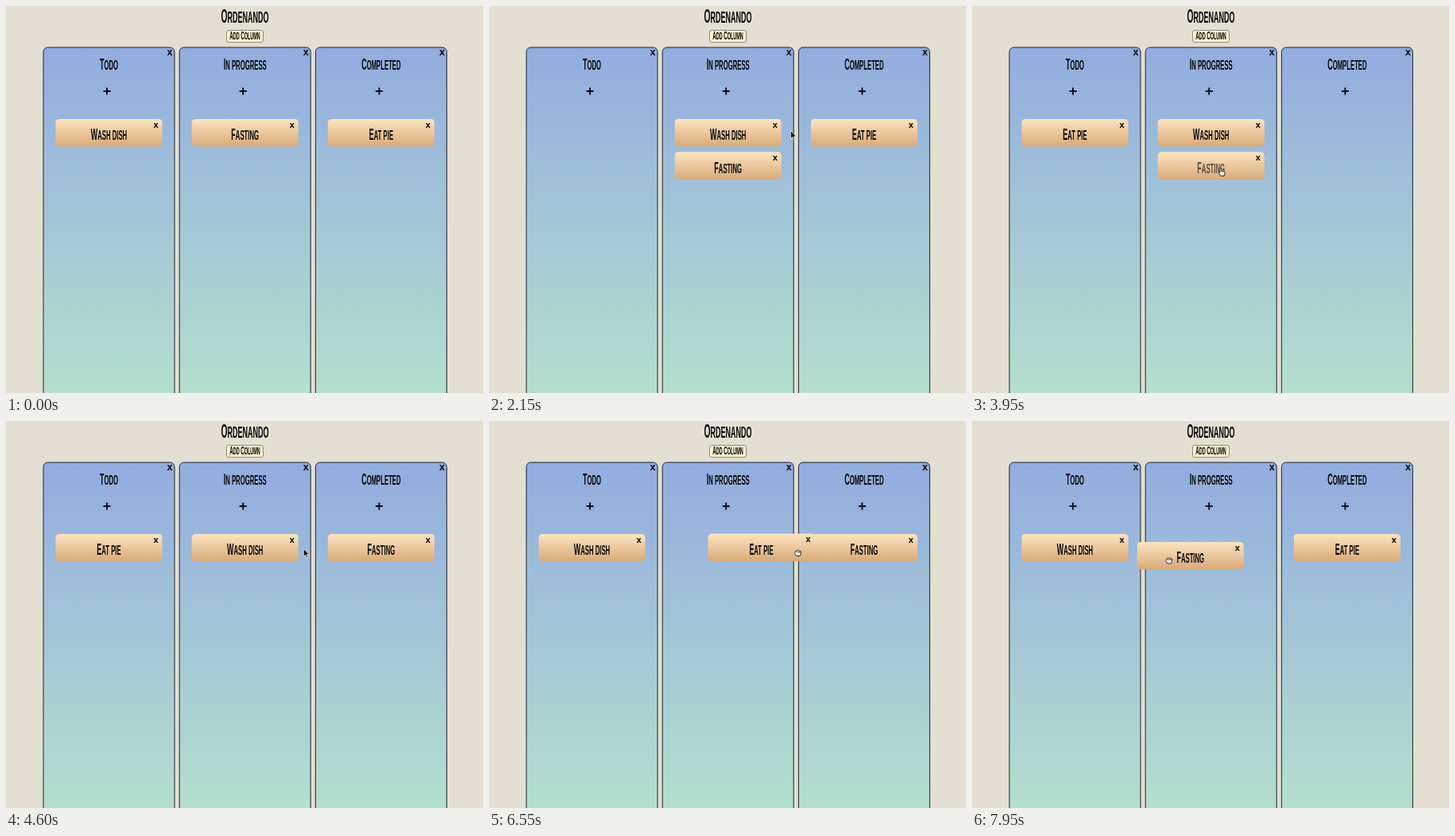
These frames come from a looping animation (600x486 px, 8000 ms). An HTML page:

```html
<!DOCTYPE html>
<html lang="en">
<head>
<meta charset="utf-8">
<title>Task board</title>
<style>
  html, body { margin: 0; width: 100%; height: 100%; overflow: hidden; background: #e3dfd3; }
  svg { display: block; width: 100%; height: 100%; }
  text { font-family: "Liberation Sans", Arial, sans-serif; font-weight: bold; text-anchor: middle; fill: #050505; }
</style>
</head>
<body>
<svg id="stage" viewBox="0 0 600 486">
  <defs>
    <linearGradient id="lane" x2="0" y2="1">
      <stop stop-color="#92acdf"/><stop offset="1" stop-color="#b4e0cd"/>
    </linearGradient>
    <linearGradient id="paper" x2="0" y2="1">
      <stop stop-color="#fde4c1"/><stop offset="1" stop-color="#d8aa78"/>
    </linearGradient>
  </defs>
  <g id="board"></g>
  <g id="cards"></g>
  <g id="cursor" fill="#fff" stroke="#111" stroke-width=".9" stroke-linejoin="round">
    <path id="arrow" d="M0-4V6L2.5 4 4 7.5 5.5 6.8 4 3.5H7Z" fill="#111" stroke="#fff" stroke-width=".7"/>
    <path id="point" d="M-1.8 1V-4.2Q-.8-5.6.2-4.2V-.8L3.4-.3Q4.6 0 4.4 1.6L3.6 5H-.8L-4 1.2Q-3.6-.2-1.8 1Z"/>
    <path id="fist" d="M-3.2-.6Q-4.6.2-3.6 1.4L-1.8 4H2.6L3.8.8V-1.6Q3-3 2-2.2 1-3.6 0-2.5-1-3.5-2-2.3-3.4-2.6-3.2-.6ZM-1.2-1.8V0M.8-1.8V0M2.4-1.6V0"/>
  </g>
</svg>
<script>
const LOOP = 8000;
const $ = id => document.getElementById(id);

// Narrow small-capitals lettering; capital letters are a little taller.
function lettering(text, x, y, size) {
  const glyphs = text.replace(/[A-Z]|[a-z]+/g, part =>
    `<tspan font-size="${part < 'a' ? size * 1.15 : size}">${part.toUpperCase()}</tspan>`);
  return `<text transform="translate(${x} ${y}) scale(.45 1)" font-size="${size}">${glyphs}</text>`;
}

const closeMark = (x, y, size) => `<text x="${x}" y="${y}" font-size="${size}">x</text>`;

const column = (name, i) => `<g transform="translate(${i * 171.2})">
  <rect x="47" y="52" width="165" height="440" rx="5.5" fill="url(#lane)" stroke="#1c222c"/>
  ${lettering(name, 129.5, 79.5, 17.2)}
  ${closeMark(206, 62, 12.5)}
  <path d="M122.5 107h9M127 102.5v9" stroke="#050505" stroke-width="1.8"/></g>`;

$('board').innerHTML = lettering('Ordenando', 300.5, 21, 20) +
  '<rect x="277.5" y="30.5" width="46" height="15" rx="2.5" fill="#fbf2cf" stroke="#8d8a7c"/>' +
  lettering('Add Column', 300.5, 42.3, 12.2) +
  ['Todo', 'In progress', 'Completed'].map(column).join('');

// Resting places: three columns, first and second slot, and the slot pushed aside by a dragged card.
const TODO = 62.5, PROG = 233.7, DONE = 404.9;
const TOP = 142, SECOND = 183.3, ASIDE = 190, FAR = 231.3;

// Keys are [time, x, y].
const cards = {
  wash: { label: 'Wash dish', keys: [
    [0, TODO, TOP], [800, TODO, TOP], [1400, 227, 185], [1520, 227, 185], [1780, 231, 136], [1950, PROG, TOP],
    [2850, PROG, TOP], [3000, PROG, ASIDE], [3020, PROG, ASIDE], [3200, PROG, TOP],
    [4900, PROG, TOP], [5350, 63, 110], [5560, 50, 130], [5760, TODO, TOP]] },
  fasting: { label: 'Fasting', keys: [
    [0, PROG, TOP], [1580, PROG, TOP], [1740, PROG, ASIDE], [1850, PROG, ASIDE], [2000, PROG, SECOND],
    [2850, PROG, SECOND], [3000, PROG, FAR], [3020, PROG, FAR], [3200, PROG, SECOND],
    [3980, PROG, SECOND], [4250, 386, 156], [4400, 403, 138], [4550, DONE, TOP],
    [6640, DONE, TOP], [6800, DONE, ASIDE], [6870, DONE, ASIDE], [7000, DONE, SECOND],
    [7550, DONE, SECOND], [7950, 208, 152], [8000, 201, 150]] },
  eat: { label: 'Eat pie', keys: [
    [0, DONE, TOP], [2600, DONE, TOP], [2950, 190, 111], [3150, 58, 132], [3400, TODO, TOP],
    [5160, TODO, TOP], [5385, TODO, ASIDE], [5600, TODO, ASIDE], [5760, TODO, SECOND],
    [6250, TODO, SECOND], [6550, 275, 141.5], [6850, 402, 138], [6950, DONE, TOP]] }
};

// Each grab also fixes where on the card the hand holds it.
const grabs = [
  { card: cards.wash, from: 800, to: 1800, dx: 70, dy: 21 },
  { card: cards.eat, from: 2600, to: 3250, dx: 36, dy: 21 },
  { card: cards.fasting, from: 3980, to: 4420, dx: 80, dy: 25 },
  { card: cards.wash, from: 4900, to: 5600, dx: 59, dy: 23 },
  { card: cards.eat, from: 6250, to: 6870, dx: 113, dy: 24 },
  { card: cards.fasting, from: 7550, to: LOOP, dx: 40, dy: 23 }
];

for (const card of Object.values(cards)) {
  card.node = document.createElementNS('http://www.w3.org/2000/svg', 'g');
  card.node.innerHTML = '<rect width="134" height="34.5" rx="4.5" fill="url(#paper)"/>' +
    lettering(card.label, 67, 26.3, 17.2) + closeMark(126, 10.8, 11);
  card.text = card.node.querySelector('text');
  $('cards').append(card.node);
}

// Monotone cubic interpolation: smooth through moving keys, still at holds.
function sample(keys, time, axis) {
  const last = keys.length - 1;
  if (time >= keys[last][0]) return keys[last][axis];
  const i = keys.findIndex(key => key[0] > time) - 1;
  const slope = n => n < 0 || n >= last ? 0
    : (keys[n + 1][axis] - keys[n][axis]) / (keys[n + 1][0] - keys[n][0]);
  const tangent = n => {
    const a = slope(n - 1), b = slope(n);
    return a * b > 0 ? 2 * a * b / (a + b) : 0;
  };
  const span = keys[i + 1][0] - keys[i][0], u = (time - keys[i][0]) / span, v = 1 - u;
  return keys[i][axis] * v * v * (1 + 2 * u) + keys[i + 1][axis] * u * u * (1 + 2 * v)
    + span * u * v * (tangent(i) * v - tangent(i + 1) * u);
}

const position = (card, time) => [sample(card.keys, time, 1), sample(card.keys, time, 2)];

function handAt(grab, time) {
  const [x, y] = position(grab.card, time);
  return [x + grab.dx, y + grab.dy];
}

function cursorAt(time, previous, next) {
  if (previous && time < previous.to) return handAt(previous, time);
  const start = previous ? handAt(previous, previous.to) : [110, 500];
  if (!next) return start;
  const end = handAt(next, next.from), begin = previous ? previous.to : 150;
  const u = Math.min(1, Math.max(0, (time - begin) / (next.from - 150 - begin)));
  const ease = u * u * (3 - 2 * u);
  return start.map((value, k) => value + (end[k] - value) * ease);
}

function draw(time) {
  const previous = grabs.filter(grab => grab.from <= time).pop();
  const next = grabs.find(grab => grab.from > time);
  const holding = previous && time < previous.to;
  const hovering = !holding && next && next.from - time < 170;
  for (const card of Object.values(cards)) {
    card.node.setAttribute('transform', `translate(${position(card, time)})`);
    card.text.setAttribute('opacity', hovering && next.card === card ? .62 : 1);
  }
  if (previous && $('cards').lastChild !== previous.card.node) $('cards').append(previous.card.node);

  const justReleased = previous && time < previous.to + 150;
  const shape = holding ? 'fist' : hovering || justReleased ? 'point' : 'arrow';
  for (const id of ['arrow', 'point', 'fist']) $(id).style.display = id === shape ? '' : 'none';
  $('cursor').setAttribute('transform', `translate(${cursorAt(time, previous, next)})`);
}

const origin = performance.now();
function tick() {
  draw((performance.now() - origin) % LOOP);
  requestAnimationFrame(tick);
}
tick();
</script>
</body>
</html>
```
